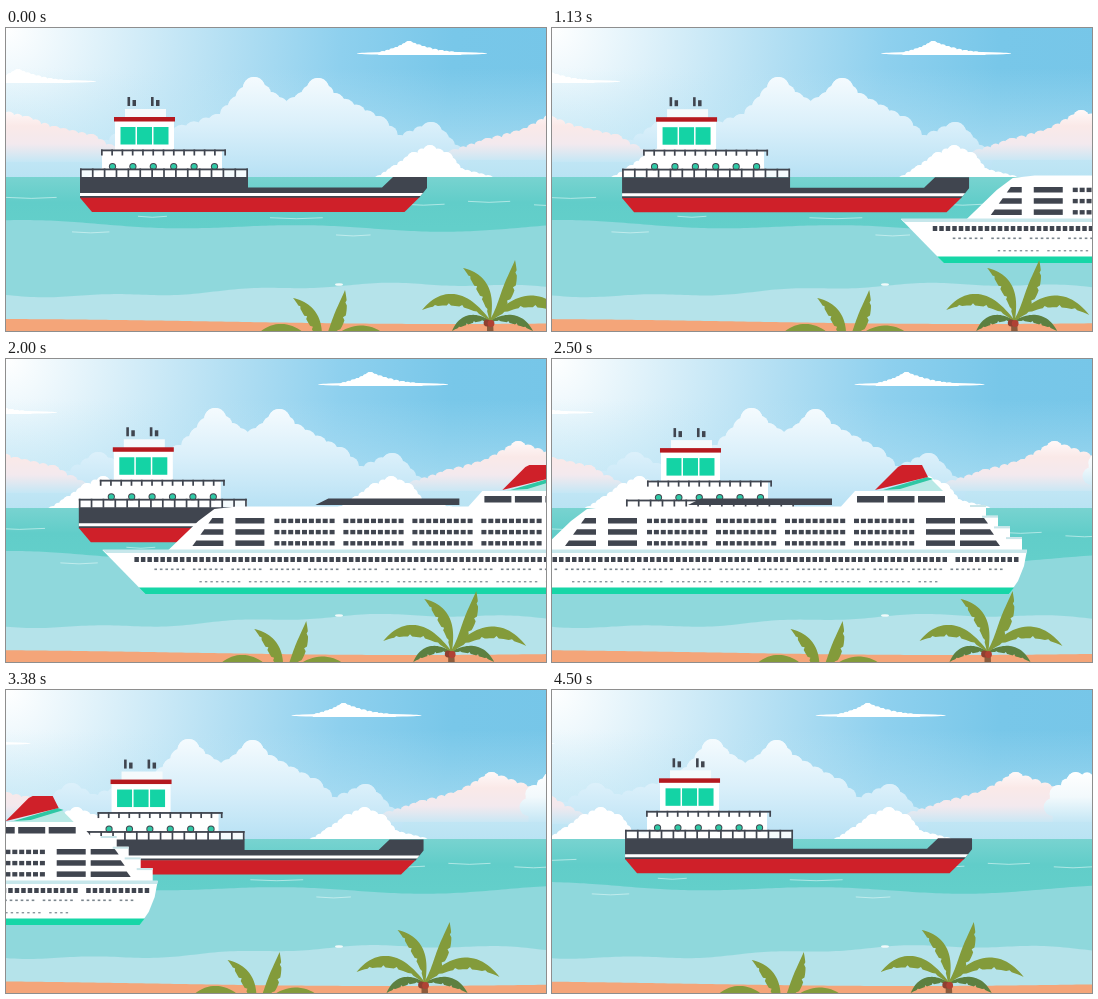
Animation of 540x303 px, one loop 4620 ms. Source, as an HTML page with a canvas:

```html
<!DOCTYPE html>
<html lang="en">
<head>
<meta charset="utf-8">
<title>Ships at sea</title>
<style>
html, body { margin: 0; width: 100%; height: 100%; overflow: hidden; background: #8fd9dc; }
canvas { display: block; width: 100vw; height: 100vh; }
</style>
</head>
<body>
<canvas id="stage" width="540" height="303"></canvas>
<script>
const W = 540, H = 303, LOOP = 4620, HORIZON = 149, TAU = Math.PI * 2;
const ctx = document.getElementById('stage').getContext('2d');
const NAVY = '#40454f', RED = '#cf2029', TEAL = '#14d3a5', LEAF = '#839b3b', SHADE = '#5d8040';

function rect(color, x, y, w, h) {
  ctx.fillStyle = color;
  ctx.fillRect(x, y, w, h);
}

function poly(color, ...p) {
  ctx.fillStyle = color;
  ctx.beginPath();
  for (let i = 0; i < p.length; i += 2) ctx.lineTo(p[i], p[i + 1]);
  ctx.closePath();
  ctx.fill();
}

function disc(color, x, y, rx, ry = rx) {
  ctx.fillStyle = color;
  ctx.beginPath();
  ctx.ellipse(x, y, rx, ry, 0, 0, TAU);
  ctx.fill();
}

function shaded(gradient, ...colors) {
  colors.forEach((c, i) => gradient.addColorStop(i / (colors.length - 1), c));
  return gradient;
}

function fade(y0, y1, ...colors) {
  return shaded(ctx.createLinearGradient(0, y0, 0, y1), ...colors);
}

function random(seed) {
  return () => (seed = seed * 16807 % 2147483647) / 2147483647;
}

// Puffs of up to the given radius follow an outline above a flat base.
function cloud(color, base, radius, ...outline) {
  const rnd = random(77), puffs = [];
  for (let i = 0; i + 3 < outline.length; i += 2) {
    const [x0, y0, x1, y1] = outline.slice(i, i + 4);
    const n = Math.ceil(Math.hypot(x1 - x0, y1 - y0) / (radius * 1.3));
    for (let k = 0; k <= n; k++) {
      const r = radius * (k % n ? 0.65 + 0.35 * rnd() : 1);
      puffs.push([x0 + (x1 - x0) * k / n, y0 + (y1 - y0) * k / n + r, r]);
    }
  }
  ctx.save();
  ctx.beginPath();
  ctx.rect(-200, 0, 1200, base);
  ctx.clip();
  ctx.fillStyle = color;
  ctx.beginPath();
  ctx.moveTo(puffs[0][0], base);
  for (const [x, y, r] of puffs) ctx.lineTo(x, y - r * 0.5);
  ctx.lineTo(puffs[puffs.length - 1][0], base);
  ctx.fill();
  for (const [x, y, r] of puffs) disc(color, x, y, r);
  ctx.restore();
}

function wisp(x, y) {
  cloud('#fff', y, 5, x + 26, y - 4, x + 40, y - 8, x + 52, y - 14, x + 66, y - 9, x + 84, y - 5, x + 100, y - 3);
  disc('#fff', x + 65, y - 1.6, 65, 1.7);
}

function sky(pan) {
  const light = ctx.createRadialGradient(0, 0, 0, 0, 0, 560);
  rect(shaded(light, '#ffffff', '#d9eff9', '#b3dff3', '#8ed0ee', '#78c7e9', '#76c6e8'), 0, 0, W, HORIZON);
  rect(fade(40, HORIZON, 'rgba(190,230,245,0)', 'rgba(190,230,245,.75)'), 0, 0, W, HORIZON);
  ctx.save();
  ctx.translate(-pan, 0);

  cloud(fade(48, HORIZON, '#f5fbfe', '#d9effa', '#b7e1f4'), HORIZON, 11,
    90, 118, 131, 93, 152, 104, 212, 86, 233, 68, 248, 49, 264, 64, 280, 74,
    298, 64, 312, 50, 328, 65, 372, 88, 393, 107, 425, 94, 456, 124);

  const haze = fade(105, HORIZON, '#cdeaf7', '#b9e3f3');
  cloud(haze, HORIZON, 11, -15, 108, 60, 115, 100, 130);
  cloud(haze, HORIZON, 11, 472, 128, 540, 114, 650, 108);

  const blush = fade(80, 134, '#fffafa', '#fae9e8', '#f3e9ee', '#c5e7f5');
  cloud(blush, 134, 8, -14, 79, 20, 88, 48, 98, 85, 106, 112, 121);
  cloud(blush, 132, 8, 449, 121, 482, 110, 520, 100, 551, 82, 590, 96);
  cloud(fade(82, 132, '#ffffff', '#f2f9fc', '#c5e7f5'), 132, 9, 588, 108, 594, 95, 611, 82, 645, 83);

  for (const x of [136, 424]) {
    cloud('#fff', HORIZON, 7, x - 50, 147, x - 34, 137, x - 16, 124, x, 117, x + 16, 124, x + 30, 140, x + 58, 147);
  }
  wisp(351, 27);
  wisp(-40, 55);
  ctx.restore();
}

function band(color, wave) {
  ctx.fillStyle = color;
  ctx.beginPath();
  ctx.moveTo(0, H);
  for (let x = 0; x <= W; x += 4) ctx.lineTo(x, wave(x));
  ctx.lineTo(W, H);
  ctx.fill();
}

function sea(pan) {
  const drift = pan * 0.3, rnd = random(4211);
  rect(fade(HORIZON, 200, '#78d3d0', '#61cdc9', '#63cfca'), 0, HORIZON, W, H);
  band('#8fd8dc', x => 198 + 3 * Math.sin((x + drift) / 45 - 2) - 3 * Math.cos((x + drift) / 125));
  ctx.strokeStyle = 'rgba(225,248,247,.6)';
  ctx.lineWidth = 1;
  for (let i = 0; i < 9; i++) {
    const x = i * 66 - drift, y = 168 + 42 * rnd(), w = 28 + 25 * rnd();
    ctx.beginPath();
    ctx.moveTo(x, y);
    ctx.quadraticCurveTo(x + w / 2, y + 2, x + w, y);
    ctx.stroke();
  }
  band('#b5e3ea', x => 262 + 6 * Math.cos(x / 110 - 0.6) + 1.5 * Math.sin((x + drift) / 22));
  disc('#f1fafa', 333, 256.5, 4, 1.3);
  band('#f4a579', x => 293.5 + 2.5 * Math.sin((x + pan) / 150 - 1.4));
}

function rail(x0, x1, y, h, gaps) {
  rect(NAVY, x0, y, x1 - x0, 1.8);
  for (let i = 0; i <= gaps; i++) rect(NAVY, x0 + (x1 - x0 - 1.7) * i / gaps, y, 1.7, h);
}

function ferry(t) {
  const a = t / 2450 * TAU;
  ctx.save();
  ctx.translate(2 * Math.cos(a) - 2, 0.8 * Math.sin(a));
  for (const x of [121.5, 145]) {
    rect(NAVY, x, 69, 2.6, 9);
    rect(NAVY, x + 5, 72, 3.5, 6);
  }
  rect('#f5fafc', 119, 81, 41, 9);
  rect('#fff', 109, 92, 59, 31);
  rect('#b5191f', 108, 89, 61, 4.5);
  for (let i = 0; i < 3; i++) rect(TEAL, 114.5 + i * 16.5, 99, 15, 17.5);
  rect('#fff', 96, 123, 120, 27);
  rail(95, 220, 121.5, 6, 12);
  rect('rgba(255,255,255,.85)', 74, 141, 168, 8);
  for (let i = 0; i < 6; i++) {
    disc(NAVY, 106.5 + i * 20.4, 138.5, 3.6);
    disc('#31c9a6', 106.5 + i * 20.4, 138.5, 2.6);
  }
  rail(74, 242, 140.5, 9, 14);
  poly(NAVY, 74, 149, 242, 149, 242, 159.5, 376, 159.5, 387, 149, 421, 149, 421, 160, 413, 170, 74, 170);
  poly('#fff', 74, 165, 417, 165, 414.5, 168, 74, 168);
  poly(RED, 74, 169.8, 413, 169.8, 398.5, 184, 86, 184);
  ctx.restore();
}

// Smooth curve through the bow's position at a few moments (in seconds).
const course = [[0.63, 485], [1.5, 247], [2.5, -77], [3.38, -402], [3.88, -545]];

function bowAt(t) {
  return course.reduce((sum, [ti, x]) =>
    sum + course.reduce((p, [tj]) => tj === ti ? p : p * (t - tj) / (ti - tj), x), 0);
}

function row(color, x, y, count, pitch, w, h, gapEvery) {
  for (let i = 0; i < count; i++) {
    if (i % gapEvery !== gapEvery - 1) rect(color, x + i * pitch, y, w, h);
  }
}

function liner(t) {
  ctx.save();
  ctx.translate(bowAt(t / 1000), 0);

  poly('#b9e9e6', 403, 132, 455, 119, 468, 132);
  poly('#2fc7a4', 408, 131, 452, 118, 458, 120, 425, 130);
  poly(RED, 400, 131, 423, 108, 427, 106, 447, 106, 453, 118);

  poly('#fff', 66, 191, 96, 162, 112, 150, 134, 147.5, 366, 147.5, 380, 132, 473, 132, 485, 146, 515, 191);
  for (let i = 0; i < 4; i++) {
    const right = 511 + i * 12, y = 146 + i * 10.7;
    rect('#fff', 440, y, right - 440, 191 - y);
    rect('#c9e5e9', right - 16, y, 16, 2);
  }
  poly(NAVY, 213, 146, 226, 139.5, 357, 139.5, 357, 146);
  row(NAVY, 382, 137, 3, 30.5, 27, 6.5, 9);

  for (let i = 0; i < 3; i++) {
    const y = 159 + i * 11.2, left = 106 - i * 8;
    poly(NAVY, left + 4, y, 121, y, 121, y + 5.5, left, y + 5.5);
    rect(NAVY, 133, y, 29, 5.5);
    row(NAVY, 172, y + 0.7, 39, 6.9, 5, 4.4, 10);
    rect(NAVY, 451, y, 29, 5.5);
    poly(NAVY, 485, y, 509 + i * 6, y, 513 + i * 6, y + 5.5, 485, y + 5.5);
  }

  poly('#fff', 0, 191, 552, 191, 549, 207, 543, 222, 534, 235, 43, 235);
  poly('#c7e7eb', 0, 190.5, 552, 190.5, 551.5, 194, 4, 194);
  poly('#16d6a7', 36.5, 228.5, 539, 228.5, 534, 235, 43, 235);
  row(NAVY, 32, 198, 79, 6.5, 4.5, 5, 69);
  row('#7b858d', 52, 209.5, 87, 5.5, 2.6, 1.6, 7);
  row('#8b959c', 97, 222, 67, 5.5, 2.4, 1.4, 9);
  ctx.restore();
}

// A curved leaf, smooth on one edge and notched on the other.
function frond(color, cx, cy, tx, ty, width) {
  const n = 28, a = [], b = [], notched = tx < 0 ? -1 : 1;
  for (let i = 0; i <= n; i++) {
    const u = i / n, v = 1 - u;
    const x = 2 * u * v * cx + u * u * tx, y = 2 * u * v * cy + u * u * ty;
    const dx = v * cx + u * (tx - cx), dy = v * cy + u * (ty - cy);
    const len = Math.hypot(dx, dy);
    const w = width * Math.sin(Math.PI * Math.pow(u, 1.2)) + 0.8 * v;
    const cut = i % 6 === 5 ? 0.6 : 1;
    const wa = w * (notched > 0 ? cut : 1), wb = w * (notched < 0 ? cut : 1);
    a.push(x - dy / len * wa, y + dx / len * wa);
    b.unshift(x + dy / len * wb, y - dx / len * wb);
  }
  poly(color, ...a, ...b);
}

function palm(x, y) {
  ctx.save();
  ctx.translate(x, y);
  poly('#8b5b3c', -3, 0, 3, 0, 4, 20, -3, 20);
  frond(SHADE, -22, -8, -38, 10, 4);
  frond(SHADE, 25, -8, 43, 10, 4);
  frond(LEAF, -34, -36, -68, -11, 5.5);
  frond(LEAF, 38, -36, 75, -6, 5.5);
  frond(LEAF, 0, -36, -27, -53, 5.5);
  frond(LEAF, 22, -26, 25, -61, 5.5);
  disc('#8d4030', -3, 2, 3.4);
  disc('#b04234', 1, 2.5, 3.4);
  ctx.restore();
}

function draw(now) {
  const t = now % LOOP;
  // The picture advances in eighths of a second.
  let step = Math.floor(t / 125);
  if (Math.round(step * 12.5) * 10 > t) step--;
  const time = step * 125, pan = time * 0.0194;
  sky(pan);
  sea(pan);
  ferry(time);
  liner(time);
  palm(314 - pan, 323);
  palm(484 - pan, 293);
}

const start = performance.now();
function tick() {
  draw(performance.now() - start);
  requestAnimationFrame(tick);
}
tick();
</script>
</body>
</html>
```
